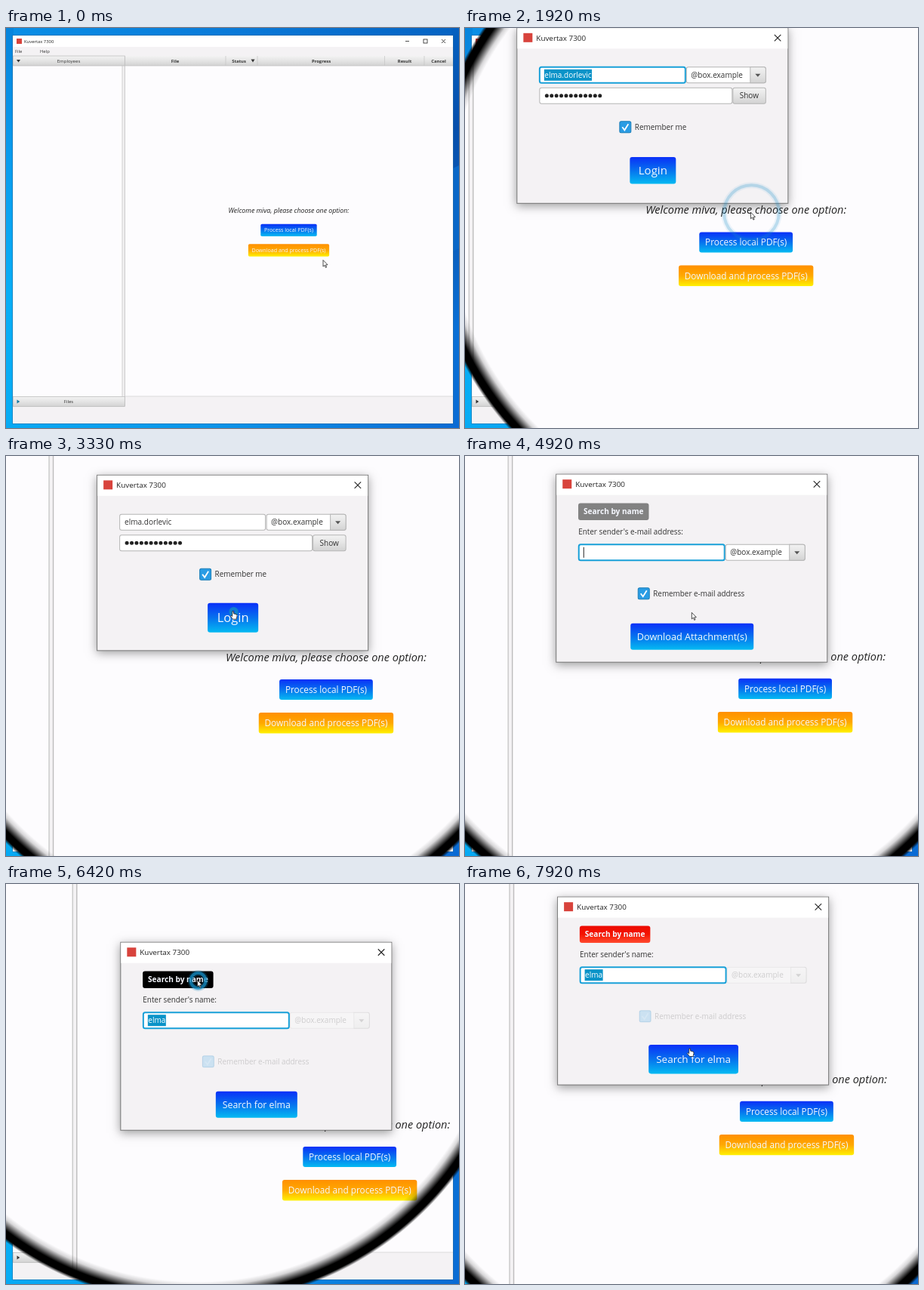
An HTML page with a canvas for the animation above (8 s loop, 600 by 530 pixels).

```html
<!DOCTYPE html>
<html lang="en">
<head>
<meta charset="utf-8">
<title>Screen recording with magnifier</title>
<style>
html, body { margin: 0; width: 100%; height: 100%; overflow: hidden; background: #0a84dc; }
canvas { display: block; width: 600px; height: 530px; }
</style>
</head>
<body>
<canvas id="stage" width="600" height="530"></canvas>
<script>
const ctx = document.getElementById('stage').getContext('2d');
const W = 600, H = 530, LOOP = 8000;
const ZOOM = 1.664, RADIUS = 430, RIM = 0.93;
const APP = 'Kuvertax 7300', USER = 'miva', NAME = 'elma';
const MAIL = NAME + '.dorlevic', DOMAIN = '@box.example';
const FONT = '"Open Sans", "Noto Sans", sans-serif';
const BLUE = ['#0a30f8', '#0672ee', '#04baf2'], ORANGE = ['#ff9000', '#ffa800', '#fff000'];
const PANEL = '#f4f2f4', WHITE = '#fdfcfe', INK = '#333';

const ramp = (t, a, b) => {
  const u = Math.min(1, Math.max(0, (t - a) / (b - a)));
  return u * u * (3 - 2 * u);
};

function rect(x, y, w, h, fill) {
  ctx.fillStyle = fill;
  ctx.fillRect(x, y, w, h);
}

function round(x, y, w, h, r, fill, stroke, lw = 1) {
  ctx.beginPath();
  ctx.roundRect(x, y, w, h, r);
  if (fill) { ctx.fillStyle = fill; ctx.fill(); }
  if (stroke) { ctx.strokeStyle = stroke; ctx.lineWidth = lw; ctx.stroke(); }
}

function line(points, color, lw) {
  ctx.beginPath();
  points.forEach(([x, y], i) => i ? ctx.lineTo(x, y) : ctx.moveTo(x, y));
  ctx.strokeStyle = color;
  ctx.lineWidth = lw;
  ctx.stroke();
}

function poly(points, fill) {
  ctx.beginPath();
  points.forEach(([x, y]) => ctx.lineTo(x, y));
  ctx.closePath();
  ctx.fillStyle = fill;
  ctx.fill();
}

function text(s, x, y, size, color = INK, align = 'left', style = '') {
  ctx.font = `${style} ${size}px ${FONT}`;
  ctx.textAlign = align;
  ctx.textBaseline = 'alphabetic';
  ctx.fillStyle = color;
  ctx.fillText(s, x, y + size * 0.36);
}

function gradient(x0, y0, x1, y1, colors) {
  const g = ctx.createLinearGradient(x0, y0, x1, y1);
  colors.forEach((c, i) => g.addColorStop(i / (colors.length - 1), c));
  return g;
}

function button(label, cx, cy, w, h, size, colors, scale = 1, style = '') {
  ctx.save();
  ctx.translate(cx, cy);
  ctx.scale(scale, scale);
  round(-w / 2, -h / 2, w, h, h > 20 ? 3 : 1.8, gradient(0, -h / 2, 0, h / 2, colors));
  text(label, 0, 0, size, '#f6f8ff', 'center', style);
  ctx.restore();
}

const grey = (y, h) => gradient(0, y, 0, y + h, ['#f3f3f3', '#e4e4e4', '#d2d2d2']);

function wallpaper() {
  rect(0, 0, W, H, gradient(0, 0, W, 0, ['#0a8fe6', '#0a7ad8', '#0562c2']));
  rect(0, 0, 10, H, gradient(0, 0, 0, H, ['#0784dc', '#0a9cee', '#08aef6', '#06acf4']));
  rect(590, 0, 10, H, gradient(0, 0, 0, H, ['#0560c0', '#0750ac', '#0a5cba', '#0a70d6', '#0a6cd4']));
  rect(0, 524, W, 6, gradient(0, 0, W, 0, ['#06aaf4', '#0a92e8', '#0a6ad4']));
  poly([[592, 186], [600, 182], [600, 292], [592, 296]], '#0a68c8');
}

function appWindow(s) {
  rect(8.5, 9.5, 584, 515, '#23679c');
  rect(9, 10, 583, 514, PANEL);
  rect(9, 10, 583, 15, '#fff');
  rect(14, 14, 7, 7, '#d8433c');
  text(APP, 24, 17.5, 5.9, s.dialog ? '#9a9a9a' : '#222');
  line([[529, 17.5], [534, 17.5]], '#222', 0.8);
  ctx.strokeRect(553, 15, 5, 5);
  line([[577, 15], [582, 20]], '#222', 0.8);
  line([[582, 15], [577, 20]], '#222', 0.8);
  text('File', 12, 31, 5.9);
  text('Help', 45, 31, 5.9);

  // sidebar
  rect(9, 37, 149, 487, PANEL);
  rect(10, 50, 144, 438, WHITE);
  line([[154, 50], [154, 488]], '#c6c6c6', 0.8);
  line([[157.3, 37], [157.3, 501]], '#bcbcbc', 0.8);
  for (const [label, y] of [['Employees', 37], ['Files', 488.5]]) {
    rect(9, y, 148.5, 13, grey(y, 13));
    ctx.strokeStyle = '#b8b8b8';
    ctx.lineWidth = 0.7;
    ctx.strokeRect(9.3, y, 148, 13);
    text(label, 83, y + 6.5, 6.1, INK, 'center');
  }
  poly([[14, 42], [19, 42], [16.5, 45.5]], '#333');
  poly([[14.5, 492.5], [14.5, 497.5], [18.3, 495]], s.dialog ? '#333' : '#1477a0');

  // table
  rect(158, 50, 434, 438, WHITE);
  rect(158, 37, 434, 13, grey(37, 13));
  line([[158, 50], [592, 50]], '#bdbdbd', 0.7);
  line([[158, 488], [592, 488]], '#cfcfcf', 0.7);
  for (const x of [291, 333, 501.5, 554]) line([[x, 37], [x, 50]], '#c4c4c4', 0.7);
  for (const [label, x] of [['File', 224], ['Status', 308.5], ['Progress', 417.5], ['Result', 528], ['Cancel', 573]])
    text(label, x, 43.5, 5.9, INK, 'center', 'bold');
  poly([[324.5, 41.5], [329.5, 41.5], [327, 45.5]], '#333');

  text(`Welcome ${USER}, please choose one option:`, 374.5, 242, 8.75, '#222', 'center', 'italic');
  button('Process local PDF(s)', 374.5, 267.9, 74.4, 16.3, 7.1, BLUE);
  button('Download and process PDF(s)', 374.5, 294.5, 107.2, 16.5, 7.1, ORANGE, s.hoverDownload);
}

function field(x, y, w, h, focus) {
  round(x + .5, y + .5, w - 1, h - 1, 2.5, '#fff', focus ? '#18a0d8' : '#b5b5b5', focus ? 2 : 1);
}

function input(value, y, focus) {
  field(30, y, 194, 22, focus);
  const mid = y + 11;
  if (!focus) return text(value, 37, mid, 10);
  if (!value) return line([[37, mid - 7], [37, mid + 7]], '#222', 1);
  ctx.font = `10px ${FONT}`;
  rect(36.5, mid - 7.5, ctx.measureText(value).width + 1, 15, '#0a93c8');
  text(value, 37, mid, 10, '#fff');
}

function combo(y) {
  field(224.5, y, 106, 22);
  text(DOMAIN, 231, y + 11, 10);
  round(309.5, y + .5, 20.5, 21, [0, 2.5, 2.5, 0], grey(y, 22), '#b5b5b5');
  poly([[316, y + 9.5], [323, y + 9.5], [319.5, y + 13.5]], '#555');
}

function check(x, y, label) {
  round(x + .5, y + .5, 15, 15, 2, '#2a9ce4', '#1d7fb8');
  line([[x + 4, y + 8], [x + 7, y + 12], [x + 12, y + 4]], '#fff', 1.8);
  text(label, x + 20.5, y + 8, 9.9);
}

function loginForm(s) {
  input(MAIL, 52, s.fieldFocus);
  combo(52);
  field(30, 79.5, 256, 22);
  for (let i = 0; i < 12; i++) {
    ctx.beginPath();
    ctx.arc(40 + i * 6.4, 90.5, 2.5, 0, 7);
    ctx.fillStyle = '#222';
    ctx.fill();
  }
  round(286.5, 80, 43.5, 21, 2.5, grey(80, 21), '#b5b5b5');
  text('Show', 308, 90.5, 10, INK, 'center');
  check(136, 124, 'Remember me');
  button('Login', 180.5, 189.5, 61, 35.5, 15, BLUE, s.hoverLogin);
}

function senderForm(s) {
  const tag = s.hoverTag ? ['#000', '#000'] : s.byName ? ['#ec0a00', '#f41400', '#ff4a30'] : ['#828282', '#828282'];
  button('Search by name', 76.5, 50, 93.5, 22.5, 10.1, tag, 1, 'bold');
  text(s.byName ? "Enter sender's name:" : "Enter sender's e-mail address:", 30, 76.5, 9.9);
  input(s.byName ? NAME : '', 93, true);
  ctx.globalAlpha = s.byName ? 0.2 : 1;
  combo(93);
  check(108.5, 150.5, 'Remember e-mail address');
  ctx.globalAlpha = 1;
  if (s.byName) button('Search for ' + NAME, 180.5, 215.5, 108, 35, 12.3, BLUE, s.hoverSearch);
  else button('Download Attachment(s)', 180.5, 215.5, 163, 35, 12.7, BLUE);
}

// The form is laid out in magnified pixels
function dialog(s) {
  const h = s.dialog === 1 ? 233.5 : 250;
  ctx.save();
  ctx.translate(191.9, 96.8);
  ctx.scale(1 / ZOOM, 1 / ZOOM);
  ctx.save();
  ctx.shadowColor = 'rgba(0,0,0,.38)';
  ctx.shadowBlur = 12;
  ctx.shadowOffsetY = 3;
  rect(0, 0, 360, h, '#777');
  ctx.restore();
  rect(1, 1, 358, h - 2, PANEL);
  rect(1, 1, 358, 27, '#fff');
  rect(9, 7.5, 12, 12, '#d8433c');
  text(APP, 26, 14, 9.85, '#222');
  line([[341.5, 9.5], [350, 18]], '#222', 1.1);
  line([[350, 9.5], [341.5, 18]], '#222', 1.1);
  (s.dialog === 1 ? loginForm : senderForm)(s);
  ctx.restore();
}

function scene(s) {
  wallpaper();
  appWindow(s);
  if (s.dialog) dialog(s);
}

function lens(s, x, y) {
  const k = s.lens, r = RADIUS * k, z = 1 + (ZOOM - 1) * k;
  ctx.save();
  ctx.beginPath();
  ctx.arc(x, y, r - 4 * k, 0, 7);
  ctx.clip();
  ctx.translate(x, y);
  ctx.scale(z, z);
  ctx.translate(-x, -y);
  scene(s);
  ctx.restore();

  const rim = ctx.createRadialGradient(x, y, r * RIM, x, y, r);
  for (const [at, a] of [[0, 0], [.2, .15], [.4, .6], [.58, 1], [.86, 1], [1, 0]])
    rim.addColorStop(at, `rgba(0,0,0,${a})`);
  ctx.beginPath();
  ctx.arc(x, y, r, 0, 7);
  ctx.arc(x, y, r * RIM, 0, 7, true);
  ctx.fillStyle = rim;
  ctx.fill();
}

function ripple(x, y, age) {
  if (age < 80 || age > 1340) return;
  const r = age * 0.033, fade = Math.min(1, (1340 - age) / 800);
  for (const [lw, a] of [[8, .25], [4, .75]]) {
    ctx.beginPath();
    ctx.arc(x, y, r, 0, 7);
    ctx.strokeStyle = `rgba(20,140,195,${a * fade})`;
    ctx.lineWidth = Math.min(lw, r + 1);
    ctx.stroke();
  }
}

function cursor(x, y, hand) {
  ctx.save();
  ctx.translate(x, y);
  ctx.beginPath();
  if (hand) {
    const pts = [[-.6, 0], [.8, 0], [1.2, 3.2], [5, 4.2], [5.6, 6], [4.6, 10.5], [0, 10.5], [-3.2, 6.5], [-2.4, 5.6], [-.8, 6.8]];
    pts.forEach(p => ctx.lineTo(...p));
  } else {
    [[0, 0], [0, 8.6], [2, 6.8], [3.4, 10], [4.7, 9.4], [3.4, 6.4], [6, 6.2]].forEach(p => ctx.lineTo(...p));
  }
  ctx.closePath();
  ctx.fillStyle = '#fff';
  ctx.fill();
  ctx.strokeStyle = '#222';
  ctx.lineWidth = 0.8;
  ctx.lineJoin = 'round';
  ctx.stroke();
  ctx.restore();
}

// [start, end, change] legs of the pointer path
const LEGS_X = [[330, 670, -5], [1450, 2700, -114.5], [4880, 6020, -47], [6960, 7920, 44]];
const LEGS_Y = [[330, 670, -14], [1450, 2330, -89.3], [2330, 2700, 1.5], [4780, 4900, 1.8], [4900, 6020, -80], [6960, 7920, 90.5]];
const travel = (t, from, legs) => legs.reduce((v, [a, b, d]) => v + d * ramp(t, a, b), from);

function draw(t) {
  const x = travel(t, 419.5, LEGS_X), y = travel(t, 307, LEGS_Y);
  const onDownload = t >= 420 && t < 1200, onLogin = t >= 3300 && t < 4830, onSearch = t >= 7700;
  const s = {
    lens: ramp(t, 870, 1340),
    dialog: t < 1200 ? 0 : t < 4830 ? 1 : 2,
    hoverDownload: 1 + (onDownload ? 0.1 * ramp(t, 330, 670) : 0),
    fieldFocus: t < 3040,
    hoverLogin: onLogin ? 1.1 : 1,
    hoverTag: t >= 5750 && t < 7150,
    byName: t >= 6250,
    hoverSearch: onSearch ? 1.1 : 1
  };
  scene(s);
  if (s.lens > 0) lens(s, x, y);
  for (const start of [820, 3210, 6120]) ripple(x + 1.5, y + 1, t - start);
  cursor(x + 0.5, y + 0.5, onDownload || onLogin || onSearch);
}

const begin = performance.now();
function tick() {
  draw((performance.now() - begin) % LOOP);
  requestAnimationFrame(tick);
}
tick();
</script>
</body>
</html>
```
